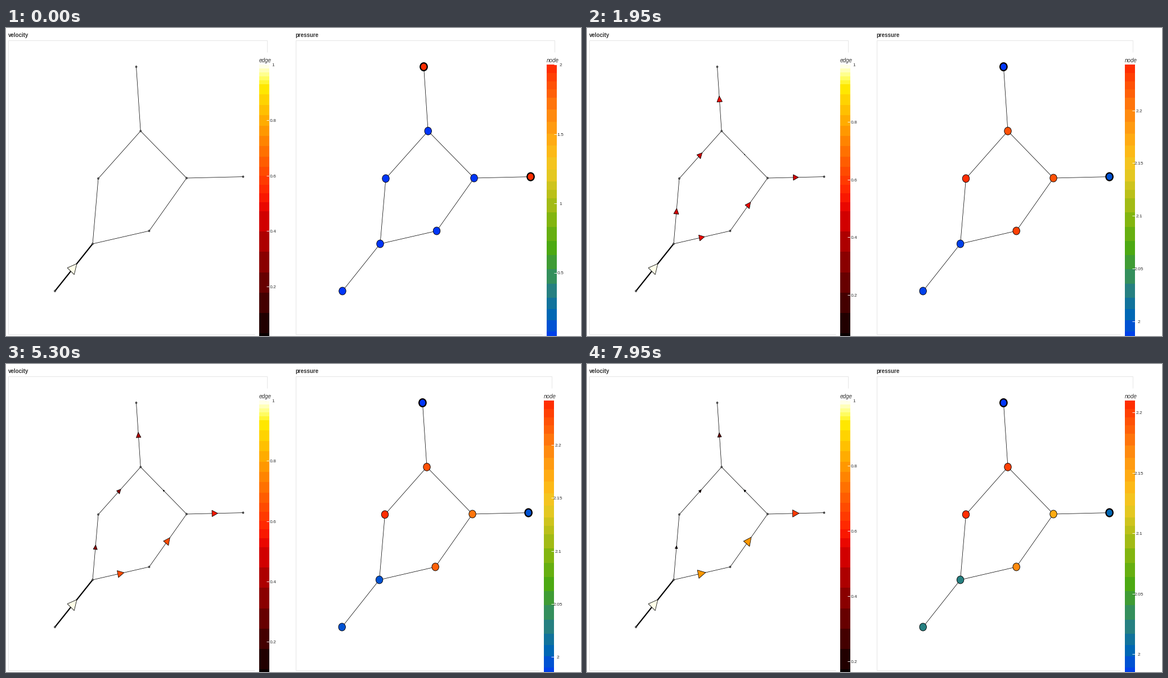
Animation, 1022 px wide and 548 px high, one loop 8000 ms. Source, as a matplotlib script:

```python
import numpy as np
import matplotlib.pyplot as plt
from matplotlib.animation import FuncAnimation
from matplotlib.colors import LinearSegmentedColormap
from matplotlib.patches import Ellipse, Polygon

W, H, DPI = 1022, 548, 128
FRAMES, STEP = 160, 50
PX = 72 / DPI
SANS = "Liberation Sans"
BAR_TOP, BAR_LEN, BAR_W = 65, 494, 17.8
SQUEEZE = .9  # the stage is narrower than its true proportions
MIN_PRESSURE = 1.98

NODES = {
    "top": (231.5, 69), "T": (239.2, 183.3), "L": (164, 267.8),
    "R": (321, 267), "out": (421.5, 264.6), "B": (254.5, 361),
    "J": (154, 384), "I": (87, 468),
}
EDGES = ["I J", "J L", "L T", "J B", "B R", "R out", "T top", "R T"]
PINNED = ("top", "out")


# Colours

def fire(n):
    red = 1.88 * n
    green = 2.08 * (n - .475)
    blue = 12.5 * (n - .92)
    return np.clip([red, green, blue], 0, 1).T


RAINBOW_STOPS = [(0, "#0032ff"), (.1, "#0068b2"), (.2, "#2d8578"),
                 (.33, "#48a812"), (.44, "#80b50f"), (.62, "#f0ca23"),
                 (.7, "#ffb614"), (.83, "#ff850e"), (1, "#ff2800")]
rainbow = LinearSegmentedColormap.from_list("rainbow_steps", RAINBOW_STOPS)


class StepMap:
    """Colour scale cut into bands, addressed by pixel row on the bar."""

    def __init__(self, cmap, *runs):
        # each run is (first row, last row, number of bands)
        parts = [np.linspace(a, b, n, endpoint=False) for a, b, n in runs]
        self.rows = np.append(np.concatenate(parts), BAR_TOP + BAR_LEN)
        mid = (self.rows[1:] + self.rows[:-1]) / 2
        self.colors = cmap((BAR_TOP + BAR_LEN - mid) / BAR_LEN)

    def __call__(self, level):
        row = BAR_TOP + BAR_LEN * (1 - level)
        i = np.searchsorted(self.rows, row, side="right") - 1
        return self.colors[np.clip(i, 0, len(self.colors) - 1)]


FIRE = StepMap(fire, (65, 100, 5), (100, 247, 8), (247, 326, 5),
               (326, 543, 6), (543, 559, 1))
RAINBOW = StepMap(rainbow, (65, 124, 4), (124, 273, 7), (273, 303, 2),
                  (303, 480, 7), (480, 540, 3), (540, 559, 2))


# Motion: u runs from 0 to 1 over the loop

def progress(t):
    return t / ((FRAMES - 1) * STEP / 1000)


def cross_flow(t):
    return .011 + .0123 * t + .039 * np.exp(t - 7.95)


def max_pressure(t):
    return 2.245 - .01 * np.exp(-t) - .0352 * progress(t) ** 6


def speeds(t):
    """Flow is conserved at every junction."""
    left = .5 - .3 * progress(t) ** 1.9
    right, cross = 1 - left, cross_flow(t)
    return dict(zip(EDGES, [1, left, left, right, right, right - cross,
                            left + cross, cross]))


def levels(t):
    u = progress(t)
    inlet = .03 + .175 * u ** 7
    return {
        "top": 0, "L": 1, "J": inlet, "I": inlet,
        "out": .05 + .06 * u ** 2,
        "T": .95 - .16 * u * (1 - u),
        "R": .94 - .19 * u ** 2.5,
        "B": .97 - .14 * u ** 2,
    }


# Drawing

fig = plt.figure(figsize=(W / DPI, H / DPI), dpi=DPI, facecolor="white")
ax = fig.add_axes([0, 0, 1, 1])
ax.set_xlim(0, W)
ax.set_ylim(H, 0)
ax.autoscale(False)
ax.axis("off")


def line(xs, ys, color="black", width=1, z=2):
    return ax.plot(xs, ys, color=color, lw=width * PX, zorder=z,
                   solid_capstyle="butt", solid_joinstyle="miter")[0]


def label(x, y, text, size, **kw):
    return ax.text(x, y, text, fontsize=size * PX, family=SANS,
                   color="#333333", zorder=6, **kw)


class Panel:
    """Frame, graph edges and colour bar with movable ticks."""

    def __init__(self, left, right, title, bar_title, cmap, ticks):
        self.left = left
        self.scale = (right - left) / 460
        start = right - 13.8
        end = start + BAR_W
        self.artists = [
            line([right - 22, left, left, right, right],
                 [544.5, 544.5, 21.5, 21.5, 43], "#e5e5e5", z=1),
            label(left + .3, 16.4, title, 9.8, weight="bold"),
            label(start - .3, 61.4, bar_title, 9.9, style="italic"),
        ]
        bars = ax.barh(cmap.rows[:-1], BAR_W, np.diff(cmap.rows), left=start,
                       align="edge", color=cmap.colors, lw=0, zorder=3)
        self.artists += list(bars.patches)
        self.ticks = []
        for v in ticks:
            mark = line([end - 5, end], [0, 0], "white", .9, z=4)
            text = label(right + 11.1, 0, f"{v:g}", 8.4, ha="center")
            self.ticks.append((v, mark, text))
            self.artists += [mark, text]

    def place(self, name):
        x, y = NODES[name]
        return np.array([self.left + (x - 3.5) * self.scale, y])

    def draw_edge(self, edge, width):
        a, b = (self.place(n) for n in edge.split())
        self.artists.append(line(*zip(a, b), width=width))

    def draw_node(self, name, size, color, width):
        dot = Ellipse(self.place(name), size * SQUEEZE, size, fc=color,
                      ec="black", lw=width * PX, zorder=5)
        self.artists.append(ax.add_patch(dot))
        return dot

    def set_range(self, low, high):
        for v, mark, text in self.ticks:
            y = BAR_TOP + (high - v) / (high - low) * BAR_LEN
            mark.set_ydata([y, y])
            text.set_y(y + 3)

    def show(self, on):
        for a in self.artists:
            a.set_visible(on)


def pressure_panel(right, ticks):
    panel = Panel(514.5, right, "pressure", "node", RAINBOW, ticks)
    for e in EDGES:
        panel.draw_edge(e, .75)
    panel.dots = {n: panel.draw_node(n, 13.8, "white",
                                     2.3 if n in PINNED else .9)
                  for n in NODES}
    return panel


velocity = Panel(3.5, 463.5, "velocity", "edge", FIRE, [.2, .4, .6, .8, 1])
arrows = {}
for e in EDGES:
    velocity.draw_edge(e, 2.2 if e == "I J" else .75)
    arrows[e] = ax.add_patch(Polygon(np.zeros((3, 2)), ec="black",
                                     lw=.8 * PX, zorder=4))
for n in NODES:
    velocity.draw_node(n, 2.8, "#aaaaaa", .9)

rest = pressure_panel(974.5, [.5, 1, 1.5, 2])
rest.set_range(0, 2)
for n, dot in rest.dots.items():
    dot.set_facecolor(RAINBOW(1 if n in PINNED else 0))
flowing = pressure_panel(970.2, [2, 2.05, 2.1, 2.15, 2.2])


def triangle(edge, speed):
    squeeze = np.array([SQUEEZE, 1])
    a, b = (velocity.place(n) / squeeze for n in edge.split())
    along = (b - a) / np.hypot(*(b - a))
    side = np.array([-along[1], along[0]])
    mid, half = (a + b) / 2, 9 * speed ** .8
    corners = [along, side - along, -side - along]
    return [(mid + half * c) * squeeze for c in corners]


def update(i):
    t = i * STEP / 1000
    started = i > 0
    flow = speeds(t) if started else {"I J": 1}
    low = cross_flow(t) if started else 0
    velocity.set_range(low, 1)
    for e, arrow in arrows.items():
        v = flow.get(e, 0)
        arrow.set_visible(v > .03)
        if v > .03:
            arrow.set_xy(triangle(e, v))
            arrow.set_facecolor(FIRE((v - low) / (1 - low)))

    rest.show(not started)
    flowing.show(started)
    if started:
        flowing.set_range(MIN_PRESSURE, max_pressure(t))
        for n, level in levels(t).items():
            flowing.dots[n].set_facecolor(RAINBOW(level))
    return []


anim = FuncAnimation(fig, update, frames=FRAMES, interval=STEP,
                     repeat=True, repeat_delay=0, blit=False)
plt.show()
```
